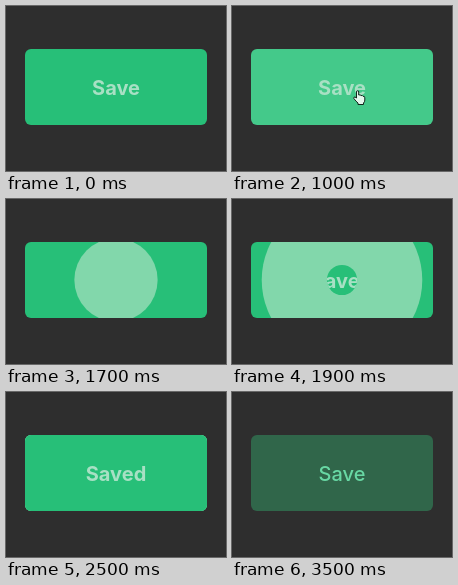
Animation, 220 px wide and 165 px high, one loop 4 s. Source, as an HTML page with a canvas:

```html
<!DOCTYPE html>
<html lang="en">
<head>
<meta charset="utf-8">
<title>Save button</title>
<style>
  html, body { margin: 0; width: 100%; height: 100%; overflow: hidden; background: #2e2e2e; }
  canvas { display: block; width: 220px; height: 165px; }
</style>
</head>
<body>
<canvas width="220" height="165"></canvas>
<script>
const ctx = document.querySelector('canvas').getContext('2d');
const LOOP = 4000, STEP = 100;
const CX = 110, CY = 81;
const GREEN = [39, 191, 120], HOVER = [68, 201, 138], DIM = [48, 102, 74];
const MINT = [130, 215, 171], LABEL = [168, 224, 196], DIM_LABEL = [104, 216, 164];

const progress = (t, from, to) => Math.min(1, Math.max(0, (t - from) / (to - from)));
const easeOut = p => 1 - (1 - p) ** 2;
const easeInExpo = p => p <= 0 ? 0 : 2 ** (10 * (p - 1));
const rgb = c => `rgb(${c.map(Math.round)})`;
const mix = (a, b, p) => a.map((v, i) => v + (b[i] - v) * p);

function label(text, color, alpha = 1, weight = 700) {
  ctx.globalAlpha = alpha;
  ctx.font = `${weight} 20px Inter, sans-serif`;
  ctx.textAlign = 'center';
  ctx.fillStyle = rgb(color);
  ctx.fillText(text, CX, 88.5);
  ctx.globalAlpha = 1;
}

function disc(radius, color) {
  ctx.beginPath();
  ctx.arc(CX, CY, radius, 0, Math.PI * 2);
  ctx.fillStyle = rgb(color);
  ctx.fill();
}

const hand = new Path2D('M3.5 8V2Q3.5 .7 4.6 .7T5.7 2V5Q7.5 4.5 8 5.6Q9.5 5 10 6.3Q11.8 6 11.8 7.8V10Q11.8 12 10.5 13V14.5H5V13Q3 11.5 .8 8.4Q.5 6.8 2 7Z');

function cursor(y, alpha) {
  ctx.save();
  ctx.globalAlpha = alpha;
  ctx.translate(121, y);
  ctx.fillStyle = '#e4f6ec';
  ctx.strokeStyle = '#12251b';
  ctx.fill(hand);
  ctx.stroke(hand);
  ctx.restore();
}

function draw(t) {
  ctx.fillStyle = '#2e2e2e';
  ctx.fillRect(0, 0, 220, 165);

  const enter = easeOut(progress(t, 200, 600));
  const leave = progress(t, 1000, 1400);
  const hover = enter * (1 - leave);
  const dim = easeInExpo(progress(t, 2700, 3200));
  const back = progress(t, 2600, 2900);

  ctx.save();
  ctx.beginPath();
  ctx.roundRect(19, 43, 182, 76, 6);
  ctx.fillStyle = rgb(mix(mix(GREEN, HOVER, hover), DIM, dim));
  ctx.fill();
  ctx.clip();

  if (t < 1600) {
    label('Save', LABEL);
  } else if (t < 2600) {
    // Two ripples: mint hides the old label, green reveals the new one
    const ripple = start => 102 * easeOut(progress(t, start, start + 650));
    label('Save', LABEL);
    disc(ripple(1550), MINT);
    disc(ripple(1850), GREEN);
    ctx.clip();
    label('Saved', LABEL);
  } else {
    label('Saved', LABEL, 1 - back);
    label('Save', mix(LABEL, DIM_LABEL, dim), back, dim < 1 ? 700 : 500);
  }
  ctx.restore();

  if (hover > 0) cursor(84 + 20 * (1 - enter) + 30 * leave ** 2, hover);
}

function frame() {
  draw(Math.floor(performance.now() % LOOP / STEP) * STEP);
  requestAnimationFrame(frame);
}
frame();
</script>
</body>
</html>
```
